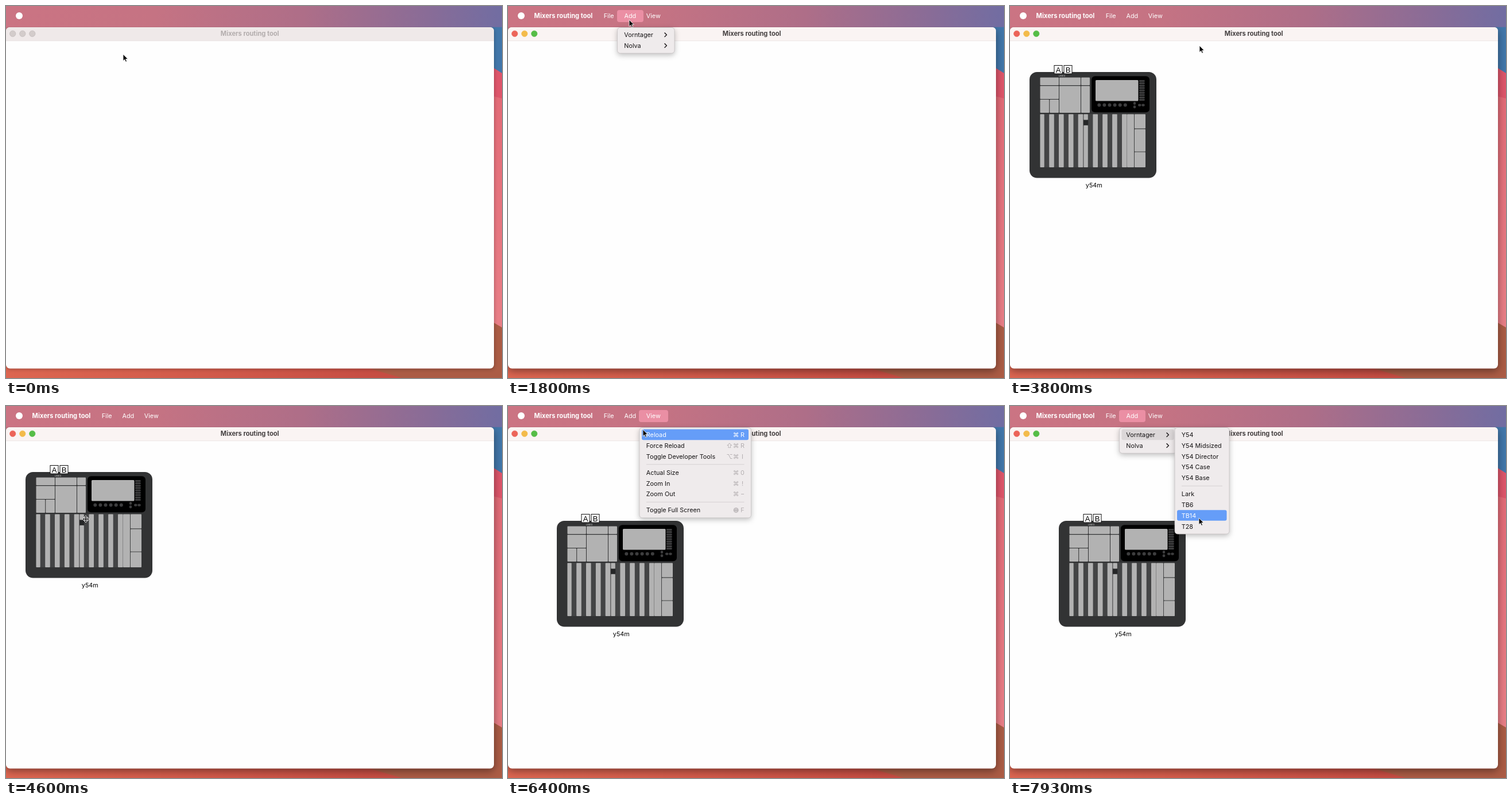
Animation, 864 px wide and 648 px high, one loop 8000 ms. Source, as an HTML page:

```html
<!DOCTYPE html>
<html lang="en">
<head>
<meta charset="utf-8">
<title>Mixers routing tool</title>
<style>
  html, body { margin: 0; width: 100%; height: 100%; overflow: hidden; }
  svg { display: block; width: 864px; height: 648px; }
  text { font: 10.8px Inter, "Liberation Sans", sans-serif; fill: #151314; white-space: pre; }
  .bold { font-weight: 700; font-size: 11.1px; }
  .bar text { fill: #fff; }
  .bar rect { fill: #ff9fb6; fill-opacity: .65; }
  .key { font-family: Inter, "DejaVu Sans", sans-serif; fill: #b3aeb0; text-anchor: middle; }
  .globe { fill: none; stroke: #b3aeb0; }
  .window { filter: drop-shadow(0 1px 3px rgba(0, 0, 0, .3)); }
  .window.active { filter: drop-shadow(0 4px 7px rgba(0, 0, 0, .42)); }
  .menu { filter: drop-shadow(0 3px 5px rgba(0, 0, 0, .25)); }
  .panel { fill: #efebec; stroke: #c6c0c2; stroke-width: .8; }
  .rule { stroke: #d6d1d3; }
  .chev { fill: none; stroke: #242122; stroke-width: 1.5; stroke-linecap: round; stroke-linejoin: round; }
  .hit { fill: none; }
  .on .hit { fill: #659df8; }
  .on text { fill: #fff; }
  .on .chev, .on .globe { stroke: #fff; }
  .trail .hit { fill: #dbd7d8; }
  .pads { fill: #b2b2b2; }
  .dark { fill: #3d3d3e; }
  .tag rect { fill: #fff; stroke: #111; }
  .tag text { font: 13px "Liberation Sans", Arial, sans-serif; fill: #000; text-anchor: middle; }
</style>
</head>
<body>
<svg viewBox="0 0 864 648">
  <defs>
    <linearGradient id="sky">
      <stop offset="0" stop-color="#cb7483"/>
      <stop offset=".3" stop-color="#c57383"/>
      <stop offset=".6" stop-color="#ae6e88"/>
      <stop offset=".85" stop-color="#896c97"/>
      <stop offset="1" stop-color="#716da2"/>
    </linearGradient>
    <linearGradient id="floor">
      <stop offset="0" stop-color="#dc6651"/>
      <stop offset=".4" stop-color="#d15a4a"/>
      <stop offset=".75" stop-color="#c64d43"/>
    </linearGradient>
    <linearGradient id="side" x2="0" y2="1">
      <stop offset="0" stop-color="#e36b77"/>
      <stop offset="1" stop-color="#e97f87"/>
    </linearGradient>
  </defs>

  <rect width="864" height="648" fill="url(#floor)"/>
  <rect width="864" height="60" fill="url(#sky)"/>
  <path d="M845 36.5H864V118L840 102Z" fill="#4277aa"/>
  <path d="M840 102L864 117V162H840Z" fill="#de566b"/>
  <path d="M840 155L864 161V562H840Z" fill="url(#side)"/>
  <path d="M840 546L864 560V648H690L635 632H840Z" fill="#ab5c45"/>

  <g id="window" class="window">
    <rect y="37" width="850" height="594.6" rx="7" fill="#fefefe"/>
  </g>
  <rect width="864" height="36.5" fill="url(#sky)"/>
  <path id="head" d="M0 61V44Q0 37 7 37H843Q850 37 850 44V61Z"/>
  <path d="M0 60.7H850" stroke="#e9e3e2" stroke-width=".8"/>
  <g id="lights" stroke-width=".6">
    <circle cx="11.7" cy="48.2" r="5.2"/>
    <circle cx="28.8" cy="48.2" r="5.2"/>
    <circle cx="45.8" cy="48.2" r="5.2"/>
  </g>
  <text id="title" class="bold" x="424.7" y="52" text-anchor="middle">Mixers routing tool</text>

  <g id="mixer"></g>

  <circle cx="23" cy="17" r="6" fill="#fff"/>
  <g id="bar" class="bar">
    <rect id="tab" y="7" height="21" rx="4"/>
    <text class="bold" x="45.6" y="21">Mixers routing tool</text>
    <text x="166.7" y="21">File</text>
    <text x="202.5" y="21">Add</text>
    <text x="240.8" y="21">View</text>
  </g>
  <g id="menus"></g>

  <path id="arrow" d="M0 0V11.6L2.7 9.2 4.5 13.3 6.5 12.4 4.7 8.5H8.3Z" fill="#0a0a0a" stroke="#fff" stroke-width=".8"/>
  <path id="move" d="M0-6L2.6-3.2H1V-1H3.2V-2.6L6 0 3.2 2.6V1H1V3.2H2.6L0 6-2.6 3.2H-1V1H-3.2V2.6L-6 0-3.2-2.6V-1H-1V-3.2H-2.6Z" fill="#0a0a0a" stroke="#fff" stroke-width=".9"/>
</svg>

<script>
const LOOP = 8000, ROW = 18.75, TOP = 50.2, GRID = 17;
const $ = id => document.getElementById(id);
const show = (el, on) => { el.style.display = on ? '' : 'none'; };
const place = (el, x, y) => el.setAttribute('transform', `translate(${x} ${y})`);

// Items: [label, shortcut], '>' marks a submenu, '-' a separator
const menus = {
  file: { x: 155, w: 178, tab: [154, 44], items: [['Load', '⌘O'], ['Save', '⌘S'], ['Export documentation', '>']] },
  add: { x: 190.5, w: 99.5, tab: [190, 46], items: [['Vorntager', '>'], ['Nolva', '>']] },
  view: { x: 229, w: 194.5, tab: [228, 51], items: [
    ['Reload', '⌘R'], ['Force Reload', '⇧⌘R'], ['Toggle Developer Tools', '⌥⌘I'], '-',
    ['Actual Size', '⌘0'], ['Zoom In', '⌘!'], ['Zoom Out', '⌘−'], '-',
    ['Toggle Full Screen', '◍F']] },
  sub: { x: 287, w: 95, items: [
    ['Y54'], ['Y54 Midsized'], ['Y54 Director'], ['Y54 Case'], ['Y54 Base'], '-',
    ['Lark'], ['TB6'], ['TB14'], ['T28']] }
};

function keys(mark, right, y) {
  if (mark === '>') return `<path class="chev" d="M${right - 6} ${y - 3.3}l3.4 3.3-3.4 3.3"/>`;
  return [...mark].reverse().map((c, i) => {
    const x = right - 4 - i * 11.3;
    if (c === '◍') return `<path class="globe" d="M${x - 4} ${y}a4 4 0 1 0 8 0a4 4 0 1 0-8 0h8M${x} ${y - 4}v8M${x - 2} ${y - 3}v6M${x + 2} ${y - 3}v6"/>`;
    return `<text class="key" x="${x}" y="${y + 4}">${c}</text>`;
  }).join('');
}

function buildMenu(name) {
  const m = menus[name];
  let y = TOP, body = '';
  m.rows = [];
  for (const item of m.items) {
    if (item === '-') {
      body += `<path class="rule" d="M${m.x + 12} ${y - 4.7}H${m.x + m.w - 12}"/>`;
      y += ROW / 2;
      continue;
    }
    const [label, mark] = item;
    body += `<g class="row"><rect class="hit" x="${m.x + 4}" y="${y - 9.6}" width="${m.w - 8.5}" height="18.6" rx="3"/>` +
      `<text x="${m.x + 11.8}" y="${y + 4}">${label}</text>` +
      (mark ? keys(mark, m.x + m.w - 11, y) : '') + '</g>';
    m.rows.push(y);
    y += ROW;
  }
  const h = y - ROW / 2 + 4 - 37.5;
  return `<g class="menu" id="${name}"><rect class="panel" x="${m.x}" y="37.5" width="${m.w}" height="${h}" rx="5"/>${body}</g>`;
}

function buildMixer() {
  const box = (x, y, w, h, r = 1) => `<rect x="${x}" y="${y}" width="${w}" height="${h}" rx="${r}"/>`;
  const dot = (x, y, r) => `<circle cx="${x}" cy="${y}" r="${r}"/>`;
  const tag = (x, c) => `<g class="tag">${box(x, -11.5, 14, 14.5, 0)}<text x="${x + 7}" y="1">${c}</text></g>`;
  const faders = [18.5, 34.2, 51, 67.9, 84.7, 110.4, 127.2, 144.1, 161];
  let s = `<rect width="221" height="184.5" rx="13" fill="#323334"/>`;
  s += `<rect x="18" y="73" width="184" height="93" fill="#434445"/>`;
  s += '<g class="pads">' +
    box(18.5, 9.5, 32.5, 13.5) + box(52, 9.5, 37, 13.5) + box(90, 9.5, 15, 13.5) +
    box(18.5, 24.3, 32.5, 22.7) + box(18.5, 48, 15.7, 23) + box(35.2, 48, 15.8, 23) +
    box(52, 24.3, 37, 46.7) + box(90, 24.3, 15, 46.7) +
    faders.map((x, i) => box(x, 73.5, i ? 8.6 : 7.2, 92.5)).join('') +
    box(94.4, 73.5, 7.4, 9.8) + box(94.4, 93, 7.4, 73) + box(170, 73.5, 12, 92.5) +
    box(183, 73.5, 19, 24.7) + box(183, 99.4, 19, 39) + box(183, 139.6, 19, 26.4) + '</g>';
  s += `<rect x="94.2" y="84" width="8" height="8" fill="#252627"/>`;
  s += `<rect x="108" y="7.3" width="101" height="63" rx="6"/>`;
  s += '<g class="pads">' + box(115, 14, 74.5, 36.5, 1.5) + '</g><g class="dark">';
  for (let i = 0; i < 9; i++) s += box(191, 14 + i * 4.1, 9.6, 3.2);
  for (let i = 0; i < 6; i++) s += dot(121.3 + i * 9.1, 57.5, 3);
  s += box(180.8, 52, 4.4, 5, 2) + box(180.8, 58.3, 4.4, 5, 2) +
    box(189, 55.5, 5.5, 4.2, 2) + box(195.2, 55.5, 5.5, 4.2, 2) + '</g>';
  s += '<text x="56.5" y="7.6" text-anchor="middle" style="font-size:4px;fill:#ccc">LINKS</text>';
  s += tag(43, 'A') + tag(60, 'B');
  return s + '<text x="112.3" y="200.6" text-anchor="middle" style="fill:#000">y54m</text>';
}

$('mixer').innerHTML = buildMixer();
$('menus').innerHTML = ['file', 'add', 'view', 'sub'].map(buildMenu).join('');

// Pointer stops: time, x, y
const path = [
  [0, 204, 84], [200, 203, 82], [720, 176, 19], [930, 178, 29], [1200, 178, 29],
  [1600, 208, 21], [2000, 214, 27], [2400, 223, 50], [2530, 225, 53], [2800, 245, 52],
  [3100, 304, 53], [3400, 330, 69], [3800, 330, 69], [4450, 140, 195], [4600, 139, 197],
  [4860, 190, 282], [4930, 190, 282], [5200, 212, -1], [5500, 240, 15], [5800, 251, 18],
  [6000, 251, 18], [6400, 235, 41], [6680, 215, 21], [7050, 226, 50], [7200, 236, 51],
  [7450, 304, 58], [7930, 329, 195], [LOOP, 329, 195]
];
const openAt = [[0, ''], [820, 'file'], [1480, 'add'], [3540, ''], [5700, 'view'], [6520, 'add']];
const DRAG = 4600, DROP = 4930;

function pointer(t) {
  const i = path.findIndex(p => p[0] > t);
  const [t0, x0, y0] = path[i - 1], [t1, x1, y1] = path[i];
  const k = (t - t0) / (t1 - t0), e = k * k * (3 - 2 * k);
  return [x0 + (x1 - x0) * e, y0 + (y1 - y0) * e];
}

function hover(name, x, y) {
  const m = menus[name];
  const inside = x >= m.x && x < m.x + m.w;
  $(name).querySelectorAll('.row').forEach((row, i) =>
    row.classList.toggle('on', inside && Math.abs(y - m.rows[i]) < ROW / 2));
}

function draw(t) {
  const [x, y] = pointer(t);
  const active = t >= 300;
  const open = openAt.filter(o => o[0] <= t).pop()[1];
  const sub = open === 'add' && (t >= 6950 || (t >= 2300 && t < 4000));

  show($('bar'), active);
  $('window').classList.toggle('active', active);
  $('head').setAttribute('fill', active ? '#faf4f3' : '#efe9e9');
  $('title').style.fill = active ? '#454041' : '#b3adad';
  const tones = active ? ['#ec6459', '#f3bb4b', '#56bd47'] : Array(3).fill('#d3cccb');
  [...$('lights').children].forEach((c, i) => {
    c.setAttribute('fill', tones[i]);
    c.setAttribute('stroke', active ? tones[i] : '#bdb6b5');
  });

  show($('tab'), open);
  if (open) {
    const [tx, tw] = menus[open].tab;
    $('tab').setAttribute('x', tx);
    $('tab').setAttribute('width', tw);
  }
  for (const name in menus) {
    const on = name === open || (name === 'sub' && sub);
    show($(name), on);
    if (on) hover(name, x, y);
  }
  const first = $('add').querySelector('.row');
  const inSub = sub && x >= menus.sub.x;
  if (inSub) first.classList.remove('on');
  first.classList.toggle('trail', inSub);

  const present = t >= 3660;
  const [hx, hy] = pointer(Math.min(Math.max(t, DRAG), DROP));
  const snap = d => Math.round(d / GRID) * GRID;
  const mx = 34 + snap(hx - 139), my = 115 + snap(hy - 197);
  show($('mixer'), present);
  place($('mixer'), mx, my);

  const over = present && !open && x > mx && x < mx + 221 && y > my && y < my + 185;
  show($('arrow'), !over);
  show($('move'), over);
  place($(over ? 'move' : 'arrow'), x, y);
}

const start = performance.now();
function tick() {
  draw((performance.now() - start) % LOOP);
  requestAnimationFrame(tick);
}
tick();
</script>
</body>
</html>
```
